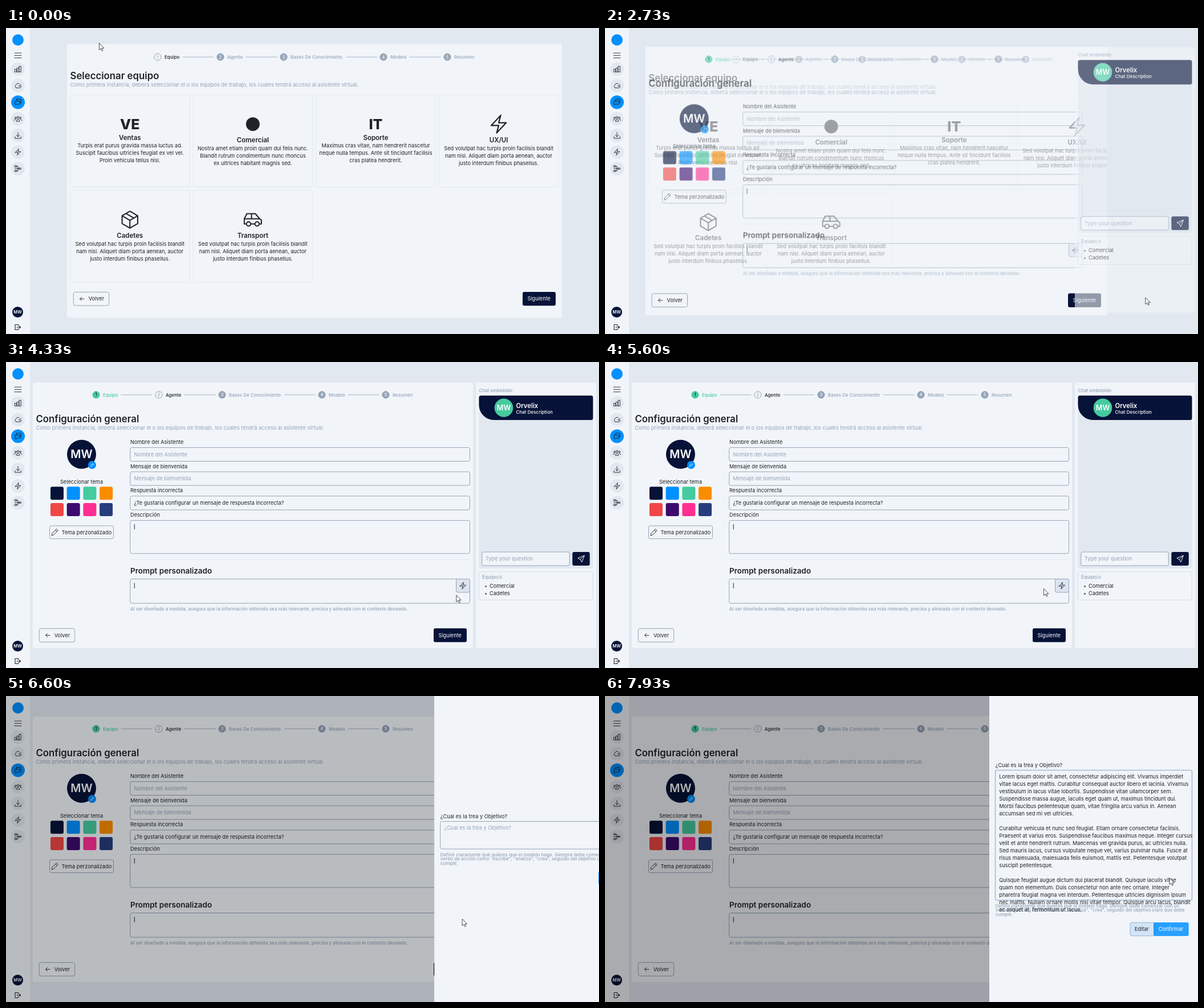
Write an HTML page that moves like this. It is 1040x538 px and loops after 8000 ms.

```html
<!DOCTYPE html>
<html lang="es">
<head>
<meta charset="utf-8">
<title>Asistente virtual</title>
<style>
html, body { margin: 0; width: 100%; height: 100%; overflow: hidden; background: #e2e8f0; }
svg { display: block; width: 100vw; height: 100vh; }
text { font-family: Inter, "Open Sans", sans-serif; white-space: pre; }
</style>
</head>
<body>
<svg id="stage" viewBox="0 0 1040 538"></svg>
<script>
const INK = '#1f2328', NAVY = '#061237', SLATE = '#94a3b8', BLUE = '#0090ff',
  GREEN = '#45cb9f', PAPER = '#f1f5f9', MIST = '#e2e8f0', LOOP = 8000, BODY = 9.2, SMALL = 8.05;

// Drawing helpers; text is placed by its vertical centre.
const text = (x, cy, s, size = BODY, fill = INK, weight = 400, anchor = 'start') =>
  `<text x="${x}" y="${(cy + size * .35).toFixed(2)}" font-size="${size}" font-weight="${weight}" fill="${fill}" text-anchor="${anchor}">${s}</text>`;
const mid = (x, cy, s, size, fill, weight) => text(x, cy, s, size, fill, weight, 'middle');
const lines = (x, cy, step, list, draw) => list.map((s, i) => draw(x, cy + i * step, s)).join('');
const rect = (x, y, w, h, fill = 'none', stroke = 'none', rx = 3, more = '') =>
  `<rect x="${x}" y="${y}" width="${w}" height="${h}" rx="${rx}" fill="${fill}" stroke="${stroke}" ${more}/>`;
const circle = (x, y, r, fill, stroke = 'none') =>
  `<circle cx="${x}" cy="${y}" r="${r}" fill="${fill}" stroke="${stroke}"/>`;
const path = (d, stroke = INK, width = 1, fill = 'none', more = '') =>
  `<path d="${d}" fill="${fill}" stroke="${stroke}" stroke-width="${width}" stroke-linecap="round" stroke-linejoin="round" ${more}/>`;
const icon = (x, y, scale, d, stroke = INK, width = 1.5) =>
  path(d, stroke, width, 'none', `transform="translate(${x} ${y}) scale(${scale}) translate(-12 -12)"`);
const group = (id, body, more = '') => `<g id="${id}" ${more}>${body}</g>`;

const ICON = {
  chart: 'M3 13h5v8H3zM9.5 9h5v12h-5zM16 4h5v17h-5z',
  cloud: 'M7 19a5 5 0 0 1-1-9 6 6 0 0 1 10-3M7 19h10a4 4 0 0 0 4-6M14 13h3l4-5M17 13l2 2',
  chat: 'M8 3h13v11h-3M8 3v6h10v9H8l-3 3v-3H3V9h5',
  users: 'M9 8a3 3 0 1 0 6 0 3 3 0 1 0-6 0M7 19c0-7 10-7 10 0zM2.5 9a2.2 2.2 0 1 0 4.4 0 2.2 2.2 0 1 0-4.4 0M17.1 9a2.2 2.2 0 1 0 4.4 0 2.2 2.2 0 1 0-4.4 0M1 17c0-3 2-4 5-4M23 17c0-3-2-4-5-4',
  down: 'M12 3v13M7 11l5 5 5-5M3 16v5h18v-5',
  bolt: 'M3.75 13.5l10.5-11.25L12 10.5h8.25L9.75 21.75 12 13.5z',
  nodes: 'M3 3h5v4H3zM3 17h5v4H3zM16 10h5v4h-5zM8 5h4v14H8M12 12h4M3 12h9',
  exit: 'M14 7V3H3v18h11v-4M9 12h13M18 8l4 4-4 4',
  cube: 'M21 7.5l-9-5.25L3 7.5v9l9 5.25 9-5.25zM3 7.5l9 5.25 9-5.25M12 12.75v9M7.5 4.9l9 5.2',
  car: 'M4.5 17H2v-6l3-6h10l5 6 2 1.5V17h-2.500M9.500 17h5M2 11h18M10.500 5v6M4.500 17a2.500 2.500 0 1 0 5 0 2.500 2.500 0 1 0-5 0M14.500 17a2.500 2.500 0 1 0 5 0 2.500 2.500 0 1 0-5 0',
  pencil: 'M3 21l1.500-6L17 2.500l4.500 4.500L9 19.500zM14 5.500l4.500 4.500',
  send: 'M21 3L3 10l7 4 4 7zM10 14L21 3'
};

function sidebar() {
  const items = ['chart', 'cloud', 'chat', 'users', 'down', 'bolt', 'nodes'];
  return rect(0, 0, 42, 538, PAPER, 'none', 0) + circle(21, 21, 10, BLUE) +
    path('M15 44h12M15 48.300h12M15 52.600h12', INK, .9) +
    items.map((name, i) => {
      const y = 72 + i * 29.200;
      return circle(21, y, 12, name === 'chat' ? BLUE : MIST) + icon(21, y, .58, ICON[name], INK, 1.600);
    }).join('') +
    circle(20.5, 499.5, 9.500, NAVY) + mid(20.5, 499.5, 'MW', 7.400, '#fff', 600) +
    icon(20.5, 526, .5, ICON.exit, INK, 2.200);
}

function stepper(dx, y, active) {
  const names = ['Equipo', 'Agente', 'Bases De Conocimiento', 'Modelo', 'Resumen'];
  const spots = [266, 376, 487, 662, 774], bars = [310, 421, 596.5, 708];
  return names.map((name, i) => {
    const x = spots[i] + dx, on = i === active, done = i < active;
    const tone = done ? GREEN : SLATE;
    return circle(x, y, 6.100, on ? 'none' : tone, tone) +
      mid(x, y, i + 1, 7.400, on ? SLATE : done ? NAVY : '#fff', 500) +
      text(x + 12, y, name, 8, on ? INK : tone, 500);
  }).join('') + bars.map(x => path(`M${x + dx} ${y}h54`, SLATE, .8)).join('');
}

const heading = (x, y, title) => text(x, y, title, 16.800, INK, 600) +
  text(x, y + 16, 'Como primera instancia, deberá seleccionar el o los equipos de trabajo, los cuales tendrá acceso al asistente virtual.', BODY, SLATE);

function teamPage() {
  const filler = ['Sed volutpat hac turpis proin facilisis blandit', 'nam nisl. Aliquet diam porta aenean, auctor', 'justo interdum finibus phasellus.'];
  const word = s => (x, y) => mid(x, y, s, 25, INK, 800);
  const glyph = (d, scale) => (x, y) => icon(x, y, scale, d, INK, 1.350);
  const cards = [
    ['Ventas', word('VE'), 192.5, ['Turpis erat purus gravida massa luctus ad.', 'Suscipit faucibus ultricies feugiat ex vel vel.', 'Proin vehicula tellus nisl.']],
    ['Comercial', (x, y) => circle(x, y, 12, INK), 197, ['Nostra amet etiam proin quam dui felis nunc.', 'Blandit rutrum condimentum nunc rhoncus', 'ex ultrices habitant magnis sed.']],
    ['Soporte', word('IT'), 192.5, ['Maximus cras vitae, nam hendrerit nascetur', 'neque nulla tempus. Ante sit tincidunt facilisis', 'cras platea hendrerit.']],
    ['UX/UI', glyph(ICON.bolt, 1.6), 197, filler],
    ['Cadetes', glyph(ICON.cube, 1.52), 197, filler],
    ['Transport', glyph(ICON.car, 1.5), 197, filler]
  ];
  return stepper(0, 51, 0) + heading(112.5, 84, 'Seleccionar equipo') +
    cards.map(([name, mark, y, copy], i) => {
      const x = 112.5 + (i % 4) * 215.600, dy = i < 4 ? 0 : 168, cx = x + 104.800;
      return rect(x, 117.5 + dy, 209.5, 162, 'none', MIST, 2) + mark(cx, 169 + dy) +
        mid(cx, y + dy, name, 11.500, INK, 600) +
        lines(cx, y + dy + 14.400, 13, copy, (a, b, s) => mid(a, b, s));
    }).join('');
}

function agentPage() {
  const colours = [NAVY, BLUE, GREEN, '#fa8c00', '#f04646', '#3d0a6e', '#ff2e93', '#263c7c'];
  const field = (y, h, label, value, tone) => text(218, y - 9.500, label) +
    rect(217.8, y, 595.7, h, 'none', SLATE, 3) + text(224.5, y + 12, value, BODY, tone);
  const caret = y => path(`M225.300 ${y}v8.500`, INK, 1);
  return stepper(-108, 57.7, 1) + heading(52.5, 100, 'Configuración general') +
    circle(132.5, 162.3, 25.5, NAVY) + mid(132.5, 162.3, 'MW', 19.800, '#fff', 600) +
    circle(151, 181, 7, BLUE) + icon(151, 181, .27, ICON.pencil, '#fff', 2.500) +
    mid(132.5, 210.7, 'Seleccionar tema') +
    colours.map((c, i) => rect(78 + (i % 4) * 28.700, i < 4 ? 219.3 : 248, 23, 23, c, 'none', 3)).join('') +
    rect(76.5, 288, 112, 22.7, 'none', SLATE, 3) + icon(85.5, 299.3, .6, ICON.pencil, INK, 1.500) + text(97.5, 299.5, 'Tema perzonalizado') +
    field(150.5, 24, 'Nombre del Asistente', 'Nombre del Asistente', SLATE) +
    field(193, 24, 'Mensaje de bienvenida', 'Mensaje de bienvenida', SLATE) +
    field(235.7, 24.3, 'Respuesta incorrecta', '¿Te gustaria configurar un mensaje de respuesta incorrecta?', INK) +
    field(278.5, 58.3, 'Descripción', '', INK) + caret(285.5) +
    path('M218 347.3H813', MIST, 1) + text(218, 367, 'Prompt personalizado', 13.500, INK, 600) +
    rect(217.8, 381.5, 595.7, 42.7, 'none', SLATE, 3) + caret(389) +
    rect(789.5, 381.5, 24, 23.5, '#dce4f0', SLATE, 3) + icon(801.3, 393.2, .62, ICON.bolt, INK, 1.500) +
    text(218, 434, 'Al ser diseñado a medida, asegura que la información obtenida sea más relevante, precisa y alineada con el contexto deseado.', SMALL, SLATE, 500);
}

function chatPanel() {
  return rect(824, 36, 211, 467, PAPER) + text(829.5, 49.8, 'Chat embebido', SMALL, SLATE, 500) +
    rect(829.5, 62, 200, 301, MIST) +
    path('M833 59H1026a3.500 3.500 0 0 1 3.500 3.500V98.500a3.500 3.500 0 0 1-3.500 3.500H856a26.500 26.500 0 0 1-26.500-26.500V62.500a3.500 3.500 0 0 1 3.500-3.500z', 'none', 0, NAVY) +
    circle(873, 80.5, 16.3, GREEN) + mid(873, 80.5, 'MW', 12.600, '#fff', 600) +
    text(894.5, 76.7, 'Orvelix', 11.300, '#fff', 600) + text(894.5, 88, 'Chat Description', SMALL, '#fff', 500) +
    rect(834.8, 334, 153.5, 24, PAPER, SLATE, 3) + text(841, 346.2, 'Type your question', BODY, SLATE) +
    rect(993.3, 334, 30.5, 24, NAVY) + icon(1008.5, 346, .62, ICON.send, '#fff', 1.500) +
    rect(829.3, 368.8, 200, 49.7, 'none', '#d5dde8', 4) + text(835, 378, 'Equipo/s', 8.300, SLATE, 500) +
    lines(848, 394, 13, ['Comercial', 'Cadetes'], (x, y, s) => circle(x - 6.500, y + .5, 1.200, INK) + text(x, y, s));
}

function drawer() {
  const lorem = ['Lorem ipsum dolor sit amet, consectetur adipiscing elit. Vivamus imperdiet',
    'vitae lacus eget mattis. Curabitur consequat auctor libero et lacinia. Vivamus',
    'vestibulum in lacus vitae lobortis. Suspendisse vitae ullamcorper sem.',
    'Suspendisse massa augue, iaculis eget quam ut, maximus tincidunt dui.',
    'Morbi faucibus pellentesque quam, vitae fringilla arcu varius in. Aenean',
    'accumsan sed mi vel ultricies.', '',
    'Curabitur vehicula et nunc sed feugiat. Etiam ornare consectetur facilisis.',
    'Praesent at varius eros. Suspendisse faucibus maximus neque. Integer cursus',
    'velit et ante hendrerit rutrum. Maecenas vel gravida purus, ac ultricies nulla.',
    'Sed mauris lacus, cursus vulputate neque vel, varius pulvinar nulla. Fusce at',
    'risus malesuada, malesuada felis euismod, mattis est. Pellentesque volutpat',
    'suscipit pellentesque.', '',
    'Quisque feugiat augue dictum dui placerat blandit. Quisque iaculis vitae',
    'quam non elementum. Duis consectetur non ante nec ornare. Integer',
    'pharetra feugiat magna vel interdum. Pellentesque ultricies dignissim ipsum',
    'nec mattis. Nullam ornare mollis nisi vitae tempor. Quisque arcu lacus, blandit',
    'ac aliquet at, fermentum ut lacus.'];
  const help = ['Definir claramente qué quieres que el modelo haga. Siempre debe comenzar con un',
    'verbo de acción como "escribe", "analiza", "crea", seguido del objetivo claro que debe', 'cumplir.'];
  return rect(674, 0, 366, 538, PAPER, 'none', 0) +
    rect(684.5, 220.5, 345, 48.5, 'none', SLATE, 3, 'id="area"') +
    group('low', lines(684.7, 278.7, 7.5, help, (x, y, s) => text(x, y, s, SMALL, SLATE, 500)) +
      group('edit', rect(921, 308.3, 44, 23.4, '#d3e4f5', '#8fb4dc', 3) + mid(941.3, 320.2, 'Editar')) +
      rect(962, 308, 61.7, 24, BLUE, 'none', 3, 'id="confirm"') + mid(992.5, 320.2, 'Confirmar', BODY, '#fff')) +
    group('high', text(684.7, 211.3, '¿Cual es la trea y Objetivo?') +
      group('hint', text(691.3, 231.8, '¿Cual es la trea y Objetivo?', BODY, SLATE)) +
      group('reply', lines(691.3, 231.8, 13, lorem, (x, y, s) => text(x, y, s))));
}

const back = rect(118.3, 464.3, 62.4, 23.7, PAPER, SLATE, 3) +
  path('M137 476.200h-7.500M132.700 473l-3.200 3.200 3.200 3.200', INK, .9) + text(144.7, 476.2, 'Volver');
const next = rect(906, 464, 58, 24.3, NAVY) + mid(934.7, 476.2, 'Siguiente', BODY, '#fff');
const arrow = path('M0 0V11.500L2.700 9 4.700 13.200 6.400 12.400 4.500 8.400H8z', '#222', .8, '#fff');
const hand = path('M-1 1c0-1.400 2-1.400 2 0v5l4.500 1c1.200.3 1.500 1 1.500 2l-.7 5-.8 3H-.5L-4 11.500c-.8-1.300.6-2 1.500-1.200L-1 11.700z', '#222', .9, '#fff');

document.getElementById('stage').innerHTML =
  `<clipPath id="clip">${rect(0, 0, 0, 0, '#000', 'none', 3, 'id="clipBox"')}</clipPath>` +
  rect(0, 0, 1040, 538, MIST, 'none', 0) + rect(0, 0, 0, 0, PAPER, 'none', 3, 'id="box"') +
  `<g clip-path="url(#clip)">${group('team', teamPage())}</g>` + group('agent', agentPage()) +
  group('back', back) + group('next', next) + group('chat', chatPanel()) + sidebar() +
  rect(0, 0, 1040, 538, '#000', 'none', 0, 'id="shade"') + group('drawer', drawer()) +
  group('cursor', group('arrow', arrow) + group('hand', hand));

const el = {};
document.querySelectorAll('[id]').forEach(n => el[n.id] = n);
const set = (id, attrs) => { for (const k in attrs) el[id].setAttribute(k, attrs[k]); };
const move = (id, x, y) => set(id, { transform: `translate(${x} ${y})` });
const show = (id, on) => set(id, { opacity: +on });

// Pointer path: time, x, y.
const trail = [
  [0, 163.5, 27], [500, 163.5, 27], [800, 300, 130], [1060, 468, 229], [1270, 440, 193.5], [1440, 440, 193.5],
  [1760, 239, 365], [1850, 239, 368], [2160, 954, 470], [2270, 948, 474], [2690, 948, 474.5], [2950, 945.5, 472],
  [3200, 945.5, 472], [4070, 823, 429], [4500, 770, 404], [4930, 722, 490], [5190, 560, 460], [5360, 580, 368],
  [5600, 769.5, 399], [5870, 790, 391], [6070, 799, 393], [6560, 799, 393], [7140, 935, 334], [7330, 986, 323.5],
  [7530, 990, 320], [8000, 990, 320]
];
const handTimes = [[960, 1560], [1700, 1920], [2140, 2600], [6000, 6330], [7190, 7660]];
const growth = [[0, 0], [7660, 8], [7725, 22], [7860, 110], [7925, 180]];

const clamp = v => Math.min(1, Math.max(0, v));
const smooth = v => v * v * (3 - 2 * v);

// The CSS "ease" curve, solved by bisection.
function ease(x) {
  let lo = 0, hi = 1;
  const at = (u, a, b) => 3 * u * (1 - u) ** 2 * a + 3 * u * u * (1 - u) * b + u ** 3;
  for (let i = 0; i < 20; i++) {
    const m = (lo + hi) / 2;
    if (at(m, .25, .25) < x) lo = m; else hi = m;
  }
  return at(lo, .1, 1);
}

// Hermite curve without overshoot between rest points.
function along(t, k) {
  const i = Math.min(trail.length - 2, trail.findLastIndex(p => p[0] <= t));
  const slope = j => j < 0 || j > trail.length - 2 ? 0 :
    (trail[j + 1][k] - trail[j][k]) / (trail[j + 1][0] - trail[j][0]);
  const tangent = j => {
    const a = slope(j - 1), b = slope(j);
    return a * b <= 0 ? 0 : 2 * a * b / (a + b);
  };
  const [p, q] = [trail[i], trail[i + 1]], d = q[0] - p[0], u = (t - p[0]) / d, s = smooth(u);
  return p[k] * (1 - s) + q[k] * s + d * u * (1 - u) * ((1 - u) * tangent(i) - u * tangent(i + 1));
}

function draw(t) {
  const p = ease(clamp((t - 2580) / 440));
  const frame = { x: 107 - 60 * p, y: 28.5 + 7.5 * p, width: 868 - 96 * p, height: 481 - 14 * p };
  set('box', frame);
  set('clipBox', frame);
  move('team', -60 * p, 7 * p);
  move('agent', 60 * (1 - p), -7 * (1 - p));
  move('chat', 0, -7 * (1 - p));
  show('team', 1 - p);
  show('agent', p);
  show('chat', p);
  move('back', -60 * p, 4.3 * p);
  move('next', -156 * p, 4.3 * p);

  const open = smooth(clamp((t - 6262) / 480));
  set('shade', { opacity: .3 * open });
  move('drawer', 366 * (1 - open), 0);

  const filled = t >= 7660, g = growth.findLast(s => s[0] <= t)[1];
  move('high', 0, -g / 2);
  move('low', 0, g / 2);
  set('area', { y: 220.5 - g / 2, height: 48.5 + g, stroke: filled ? '#a9b9d0' : SLATE, 'stroke-width': filled ? 1.5 : 1 });
  show('hint', !filled);
  show('reply', filled);
  show('edit', filled);
  set('confirm', { opacity: filled ? .83 : 1 });

  const pointing = handTimes.some(([a, b]) => t >= a && t < b);
  move('cursor', along(t, 1), along(t, 2));
  show('hand', pointing);
  show('arrow', !pointing);
}

function tick() {
  const now = performance.now() % LOOP;
  draw(Math.min(LOOP, Math.floor((now + 4) * .015) / .015));
  requestAnimationFrame(tick);
}
tick();
</script>
</body>
</html>
```
